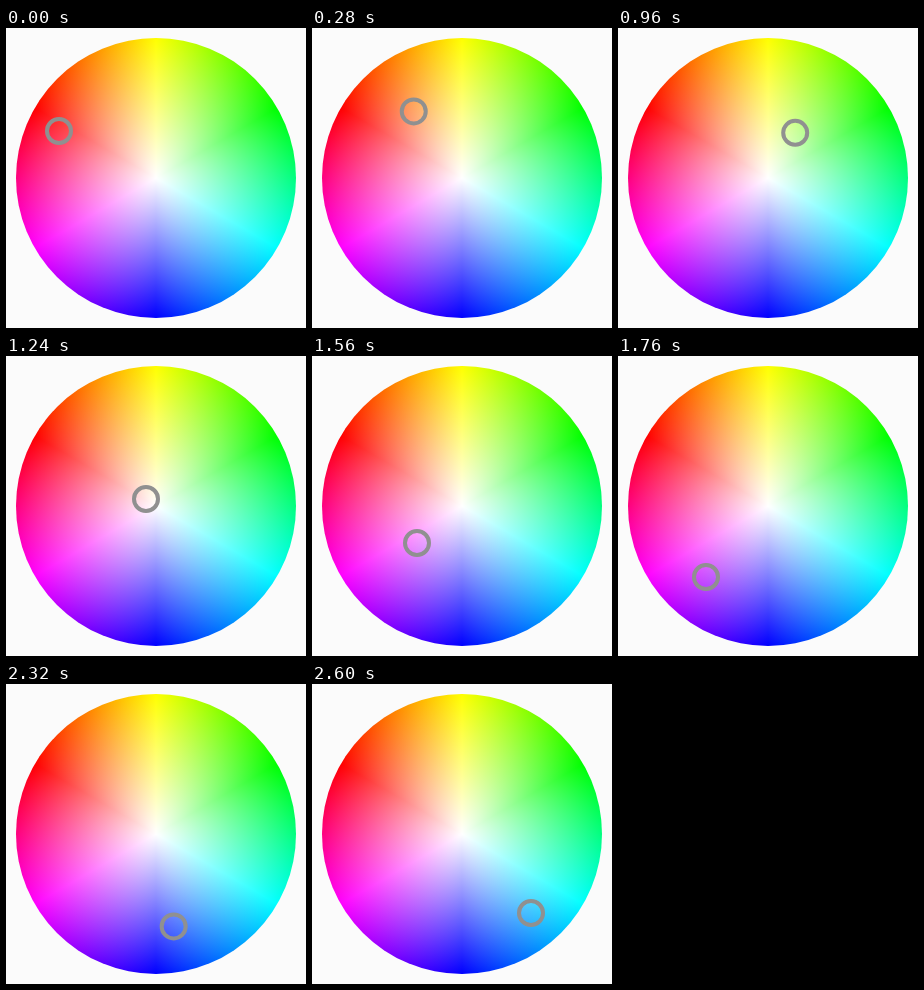
Write an HTML page that moves like this. It is 300x300 px and loops after 3.12 s.

```html
<!DOCTYPE html>
<html lang="en">
<head>
<meta charset="utf-8">
<title>Colour wheel</title>
<style>
  html, body { margin: 0; width: 100%; height: 100%; overflow: hidden; background: #fbfbfb; }
  #wheel {
    position: absolute; inset: 10px; border-radius: 50%;
    background:
      radial-gradient(closest-side, #fff, rgba(255, 255, 255, 0)),
      conic-gradient(#ff0, #0f0, #0ff, #00f, #f0f, #f00, #ff0);
  }
  #picker {
    position: absolute; left: -14px; top: -14px; width: 20px; height: 20px;
    border: 4px solid #909090; border-radius: 50%;
  }
</style>
</head>
<body>
<div id="wheel"></div>
<div id="picker"></div>
<script>
const LOOP = 3120, STEP = 40, DRAG_END = 2600;
const picker = document.getElementById('picker');

// Key points of the drag, joined by a smooth curve
const path = [
  { t: 0, x: 53, y: 103 }, { t: 600, x: 153, y: 69 },
  { t: 920, x: 179, y: 100 }, { t: 1240, x: 140, y: 143 },
  { t: 1560, x: 105, y: 187 }, { t: 1760, x: 88, y: 221 },
  { t: 2080, x: 126.5, y: 248 }, { t: DRAG_END, x: 219, y: 229 }
];

// Speed along one axis at a key point, from its neighbours
function speed(i, axis) {
  const a = path[Math.max(i - 1, 0)];
  const b = path[Math.min(i + 1, path.length - 1)];
  return (b[axis] - a[axis]) / (b.t - a.t);
}

// Cubic Hermite interpolation between key points
function position(t, axis) {
  const i = Math.max(0, path.findIndex(p => p.t >= t) - 1);
  const a = path[i], b = path[i + 1];
  const span = b.t - a.t, u = (t - a.t) / span, v = 1 - u;
  return v * v * ((1 + 2 * u) * a[axis] + u * span * speed(i, axis))
       + u * u * ((1 + 2 * v) * b[axis] - v * span * speed(i + 1, axis));
}

function draw() {
  const now = (performance.now() - start) % LOOP;
  const t = Math.min(Math.floor(now / STEP) * STEP, DRAG_END);
  picker.style.transform = `translate(${position(t, 'x')}px, ${position(t, 'y')}px)`;
  requestAnimationFrame(draw);
}

const start = performance.now();
draw();
</script>
</body>
</html>
```
